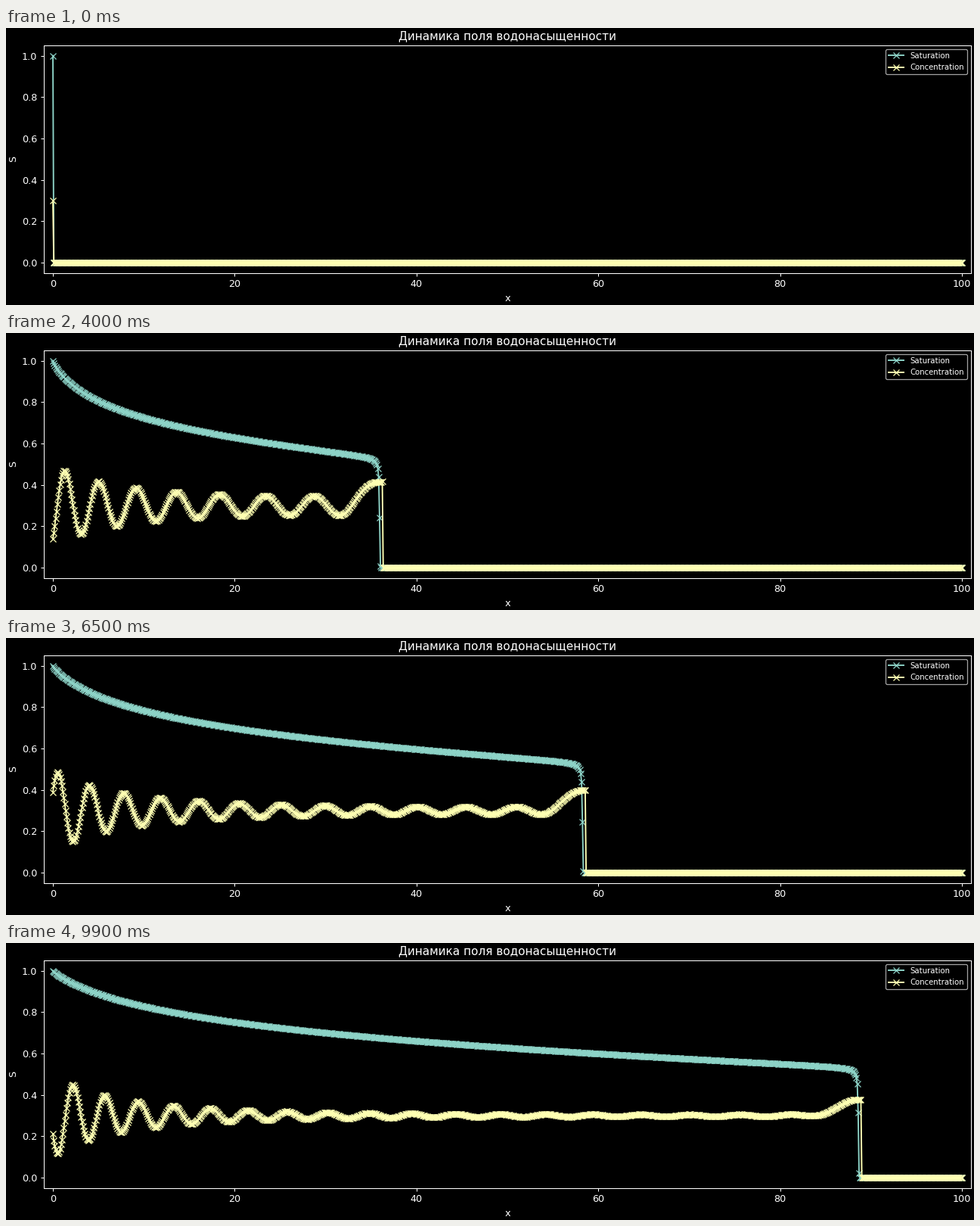
Recreate the animation shown at these times as a matplotlib script. Size 1280 by 366 pixels, loop 10 s.

```python
import numpy as np
import matplotlib.pyplot as plt
from matplotlib.animation import FuncAnimation

WIDTH, HEIGHT, DPI = 1280, 366, 1280 / 14
FRAMES, INTERVAL = 100, 100

NODES = 1000
STEPS = 24                 # solver steps per frame
COURANT = 6 / STEPS        # injected volume per step, in cells
OMEGA = 12 * 100 / (NODES - 1)   # inlet concentration phase per frame
TRACE = 1e-45              # water below this carries no concentration


def water_fraction(s):
    """Buckley-Leverett fractional flow of water."""
    water = s ** 2.5
    oil = 0.25 * (1 - s) ** 2
    return water / (water + oil)


def inlet(time):
    return 0.3 + 0.2 * np.sin(OMEGA * time)


def simulate():
    """Explicit upwind transport of water and of the dissolved agent."""
    s = np.zeros(NODES)
    s[0] = 1
    mass = np.zeros(NODES)
    c = np.zeros(NODES)
    c[0] = inlet(0)
    history = [(s.copy(), c.copy())]
    for step in range(1, (FRAMES - 1) * STEPS + 1):
        flow = water_fraction(s)
        carried = flow * c
        s[1:] -= COURANT * np.diff(flow)
        mass[1:] -= COURANT * np.diff(carried)
        np.clip(s, 0, 1, out=s)
        c = np.where(s > TRACE, mass / np.maximum(s, TRACE), 0)
        c[0] = inlet(step / STEPS)
        if step % STEPS == 0:
            history.append((s.copy(), c.copy()))
    return history


history = simulate()
x = np.linspace(0, 100, NODES)

plt.style.use("dark_background")
plt.rcParams["font.family"] = "DejaVu Sans"
fig = plt.figure(figsize=(WIDTH / DPI, HEIGHT / DPI), dpi=DPI)
ax = fig.add_axes([50 / WIDTH, 42.4 / HEIGHT, 1226 / WIDTH, 300.7 / HEIGHT])
ax.set(xlim=(-1, 101), ylim=(-0.05, 1.05), xlabel="x", ylabel="S",
       title="Динамика поля водонасыщенности")

saturation, = ax.plot(x, history[0][0], marker="x", color="#8dd3c7",
                      label="Saturation")
concentration, = ax.plot(x, history[0][1], marker="x", color="#feffb3",
                         label="Concentration")
ax.legend(loc="upper right", fontsize=8)


def update(frame):
    s, c = history[frame]
    saturation.set_ydata(s)
    concentration.set_ydata(c)
    return saturation, concentration


anim = FuncAnimation(fig, update, frames=FRAMES, interval=INTERVAL,
                     repeat=True, repeat_delay=0)
plt.show()
```
